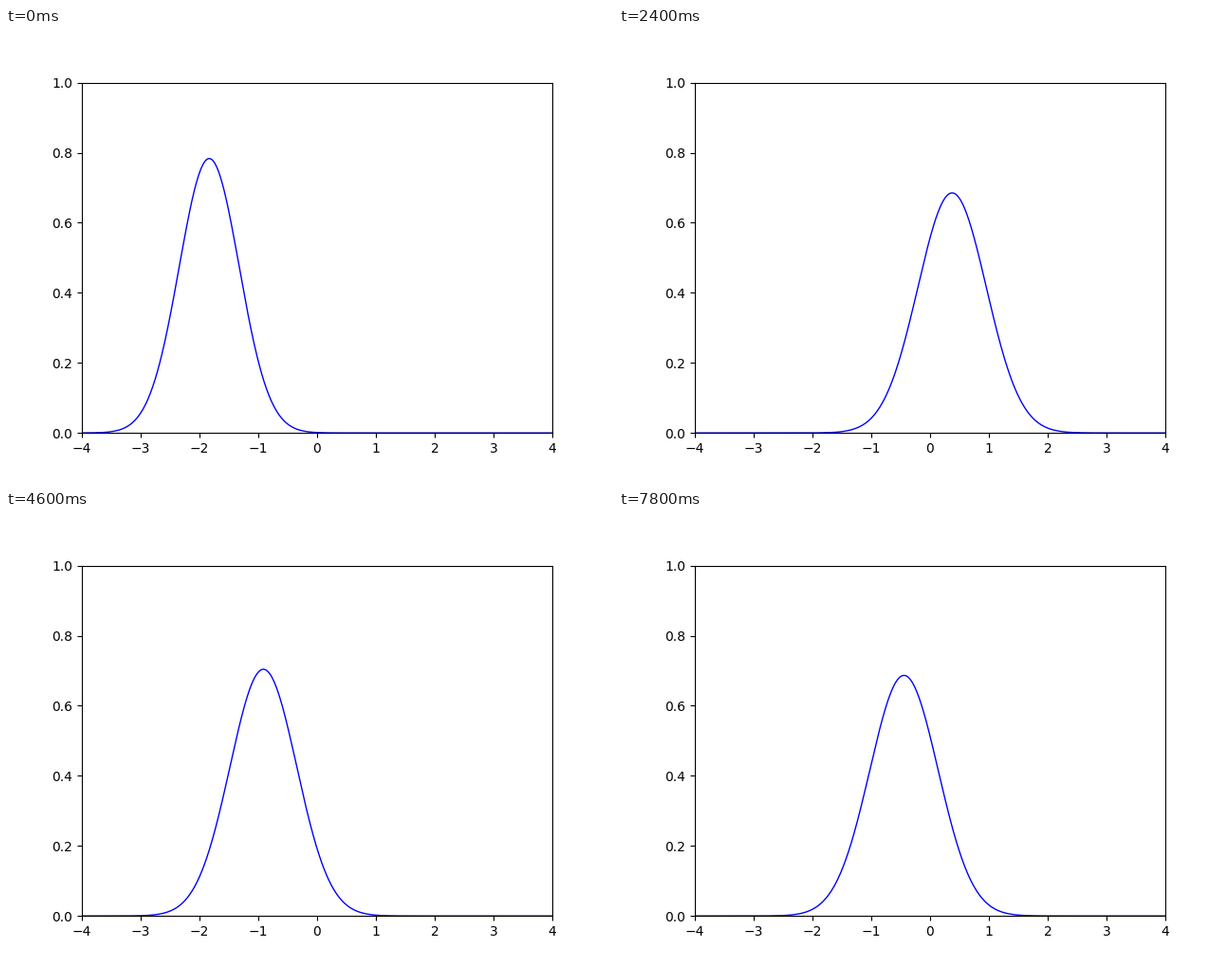
Animation of 640 by 480 pixels, one loop 8 s. Source, as a matplotlib script:

```python
import numpy as np
import matplotlib.pyplot as plt
from matplotlib.animation import FuncAnimation

FRAMES = 40
STEP_MS = 200
SWING = 2.0

fig, ax = plt.subplots(figsize=(6.4, 4.8), dpi=100)
ax.set_xlim(-4, 4)
ax.set_ylim(0, 1)
x = np.linspace(-4, 4, 1000)
(line,) = ax.plot([], [], color="blue", lw=1)


def phase(k):
    """Oscillation phase, speeding up steadily."""
    return 0.41 + 0.0085 * k + 0.00866 * k**2


def packet(k):
    """Bell curve that is narrowest at the turning points."""
    theta = phase(k)
    center = -SWING * np.cos(theta)
    c = np.cos(2 * theta)
    height = 0.7408 + 0.065 * c - 0.006 * c**3
    sigma = 1 / (height * np.sqrt(2 * np.pi))
    return height * np.exp(-0.5 * ((x - center) / sigma) ** 2)


def update(k):
    line.set_data(x, packet(k))
    return (line,)


anim = FuncAnimation(fig, update, frames=FRAMES, interval=STEP_MS,
                     init_func=lambda: update(0), repeat=True, repeat_delay=0)
plt.show()
```
